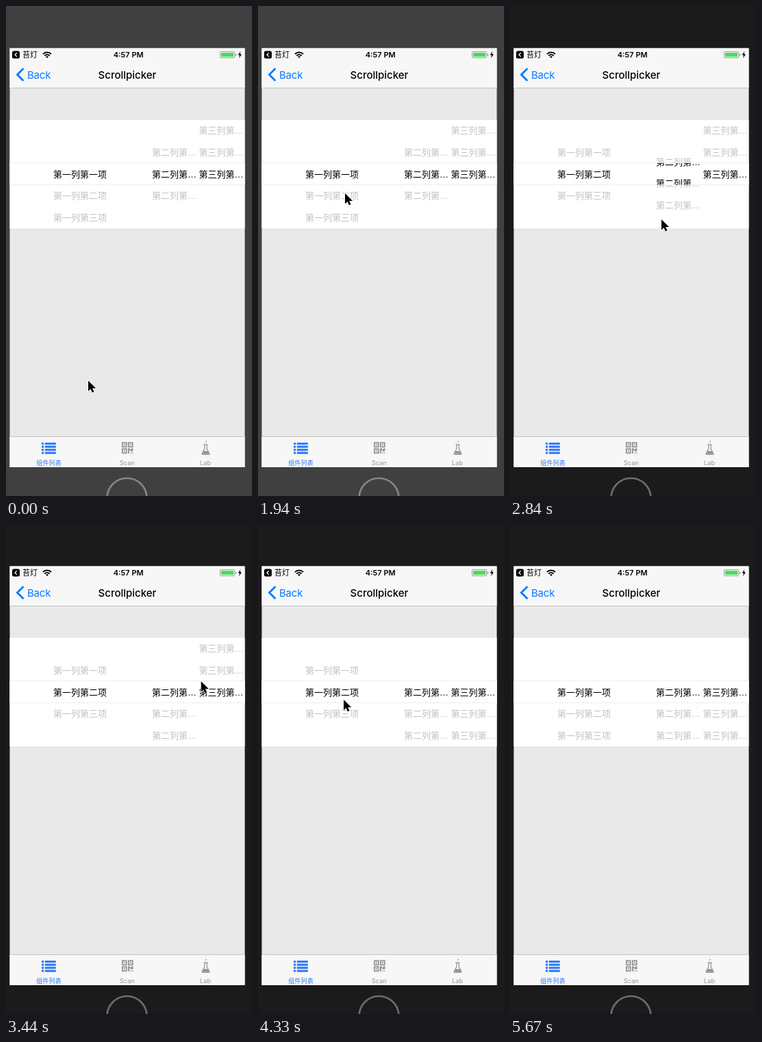
An HTML page for the animation above (6120 ms loop, 359 by 714 pixels).

```html
<!DOCTYPE html>
<html lang="zh-CN">
<head>
<meta charset="utf-8">
<title>Scrollpicker</title>
<style>
  html, body { margin: 0; width: 100%; height: 100%; overflow: hidden; background: #1b1b1b; }
  svg { display: block; font-family: Inter, "Noto Sans CJK SC", sans-serif; }
  .items { font: 13px "Liberation Sans", "Noto Sans CJK SC", sans-serif; }
  .tab { font-size: 9px; text-anchor: middle; letter-spacing: .15px; }
</style>
</head>
<body>
<svg width="359" height="714" viewBox="0 0 359 714">
  <defs>
    <clipPath id="list"><rect x="5.5" y="166" width="343" height="158"/></clipPath>
    <clipPath id="band"><rect x="5.5" y="229" width="343" height="31.5"/></clipPath>
  </defs>
  <rect id="bezel" width="359" height="714"/>
  <circle id="home" cx="176.5" cy="717" r="29" fill="none" stroke-width="2.6"/>
  <rect x="5.5" y="61.5" width="343" height="610.5" fill="#e9e9e9"/>

  <!-- picker -->
  <rect x="5.5" y="166" width="343" height="158" fill="#fff"/>
  <g class="items" clip-path="url(#list)" fill="#c2c2c2"></g>
  <rect x="5.5" y="229" width="343" height="31.5" fill="#fff"/>
  <path d="M5.5 228.5h343M5.5 260.5h343" stroke="#eee"/>
  <g class="items" clip-path="url(#band)" fill="#000"></g>

  <!-- status and navigation bars -->
  <path d="M5.5 61.5h343v58h-343z" fill="#f7f7f7"/>
  <path d="M5.5 119.5h343" stroke="#c4c4c4"/>
  <rect x="9" y="65.5" width="11" height="11" rx="2.5"/>
  <path d="M15.8 68.3l-2.8 2.7 2.8 2.7" fill="none" stroke="#fff" stroke-width="1.3"/>
  <text x="24" y="75" font-size="11">苔灯</text>
  <g fill="none" stroke="#000" stroke-width="1.9">
    <path d="M54 70a8.6 8.6 0 0 1 12 0M56.3 72.5a5.4 5.4 0 0 1 7.4 0"/>
    <path d="M60 76l-2-2.2a3 3 0 0 1 4 0z" fill="#000" stroke="none"/>
  </g>
  <text x="178.7" y="75" font-size="11" font-weight="600" text-anchor="middle">4:57 PM</text>
  <rect x="312.5" y="66.5" width="21" height="9" rx="1.5" fill="#fff" stroke="#999"/>
  <rect x="314" y="68" width="18" height="6" fill="#4cd964"/>
  <path d="M335.3 69.5v3" stroke="#888" stroke-width="1.3"/>
  <path d="M342.3 66l-3.7 5.5h2.4l-1 4.5 4-5.7h-2.5z"/>
  <path d="M25.5 91l-9 9 9 9" fill="none" stroke="#0a7aff" stroke-width="2.8"/>
  <text x="31" y="105.5" font-size="15" letter-spacing="-.2" fill="#0a7aff">Back</text>
  <text x="177" y="105.5" font-size="15" font-weight="500" text-anchor="middle">Scrollpicker</text>

  <!-- tab bar -->
  <path d="M5.5 627.5h343V672h-343z" fill="#f7f7f7"/>
  <path d="M5.5 627.5h343" stroke="#c4c4c4"/>
  <g fill="#2f78f4">
    <path d="M52 637.8h3.2m1.6 0h16M52 642.3h3.2m1.6 0h16M52 646.8h3.2m1.6 0h16M52 651.3h3.2m1.6 0h16"
      stroke="#2f78f4" stroke-width="3"/>
    <text class="tab" x="62.5" y="669">组件列表</text>
  </g>
  <g fill="#929292" stroke="#929292">
    <path d="M169.8 636.3h6v6h-6zM178.8 636.3h6v6h-6zM169.8 645.3h6v6h-6z" fill="none" stroke-width="1.7"/>
    <path d="M171.8 638.3h2v2h-2zM180.8 638.3h2v2h-2zM171.8 647.3h2v2h-2zM178 644.5h3v1.6h2v-1.6h2.5v4.2h-4v-1.6h-1.6v4.8H178zM181.5 650.5h1.4v1.4h-1.4zM184 650.5h1.4v1.4H184z" stroke="none"/>
    <path d="M288.3 639.3h6.4M289.8 639.5v5.5l-3.6 7q-.5 1.5 1 1.5h8.6q1.5 0 1-1.5l-3.6-7v-5.5" fill="none" stroke-width="1.2"/>
    <path d="M288.6 648.5h5.8l2 4.2h-9.8z" stroke="none"/>
    <circle cx="292.2" cy="634.6" r=".9" stroke="none"/>
    <circle cx="290.8" cy="637" r=".6" stroke="none"/>
  </g>
  <g fill="#929292">
    <text class="tab" x="177" y="669">Scan</text>
    <text class="tab" x="291" y="669">Lab</text>
  </g>

  <path id="cursor" d="M0 0v15.2l3.5-3.3 2.3 5.4 2.7-1.2-2.3-5.2h4.9z" stroke="#fff" stroke-width="1.2" paint-order="stroke"/>
</svg>
<script>
const LOOP = 6120, FIRST = 1195, STEP = 149, ROW = 31.6;
const $ = id => document.getElementById(id);

// Keyframes: [step, value...]
const columns = [
  { x: 69, start: 0, label: i => `第一列第${'一二三'[i]}项`,
    keys: [[5, 0], [6, -46], [7, -46], [8, -ROW], [23, -ROW], [25, 4], [26, 0]] },
  { x: 213, start: 1, label: () => '第二列第…',
    keys: [[10, 0], [11, 13.5], [12, 28], [13, ROW]] },
  { x: 281.5, start: 2, label: () => '第三列第…',
    keys: [[16, 0], [18, 70], [19, 2 * ROW]] }
];
const cursorKeys = [
  [-1, 120, 546], [3, 128, 292], [4, 128, 292], [5, 127, 273], [6, 133, 235], [7, 134, 233],
  [10, 217, 293], [11, 221, 311], [12, 222, 323], [13, 230, 308], [16, 312, 190],
  [18, 316, 317], [19, 255, 297], [21, 125, 256], [23, 125, 262], [25, 128, 297],
  [26, 133, 325], [29, 200, 664]
];

function sample(keys, step) {
  const next = keys.findIndex(key => key[0] > step);
  if (next === 0) return keys[0].slice(1);
  if (next < 0) return keys[keys.length - 1].slice(1);
  const a = keys[next - 1], b = keys[next];
  const p = (step - a[0]) / (b[0] - a[0]);
  return a.slice(1).map((v, i) => v + (b[i + 1] - v) * p);
}

const markup = columns.map(({ x, start, label }) => '<g>' + [0, 1, 2].map(i =>
  `<text x="${x}" y="${249.6 + (i - start) * ROW}">${label(i)}</text>`).join('') + '</g>').join('');
const layers = [...document.querySelectorAll('.items')];
layers.forEach(layer => layer.innerHTML = markup);

function draw() {
  const time = performance.now() % LOOP;
  const step = Math.max(-1, Math.floor((time - FIRST) / STEP));
  const dark = step >= 6;
  $('bezel').setAttribute('fill', dark ? '#1b1b1b' : '#404040');
  $('home').setAttribute('stroke', dark ? '#6c6c6c' : '#858585');
  columns.forEach(({ keys }, i) => {
    const [dy] = sample(keys, step);
    layers.forEach(layer => layer.children[i].setAttribute('transform', `translate(0 ${dy})`));
  });
  $('cursor').setAttribute('transform', `translate(${sample(cursorKeys, step)})`);
  $('cursor').setAttribute('visibility', step < 30 ? 'visible' : 'hidden');
  requestAnimationFrame(draw);
}
draw();
</script>
</body>
</html>
```
